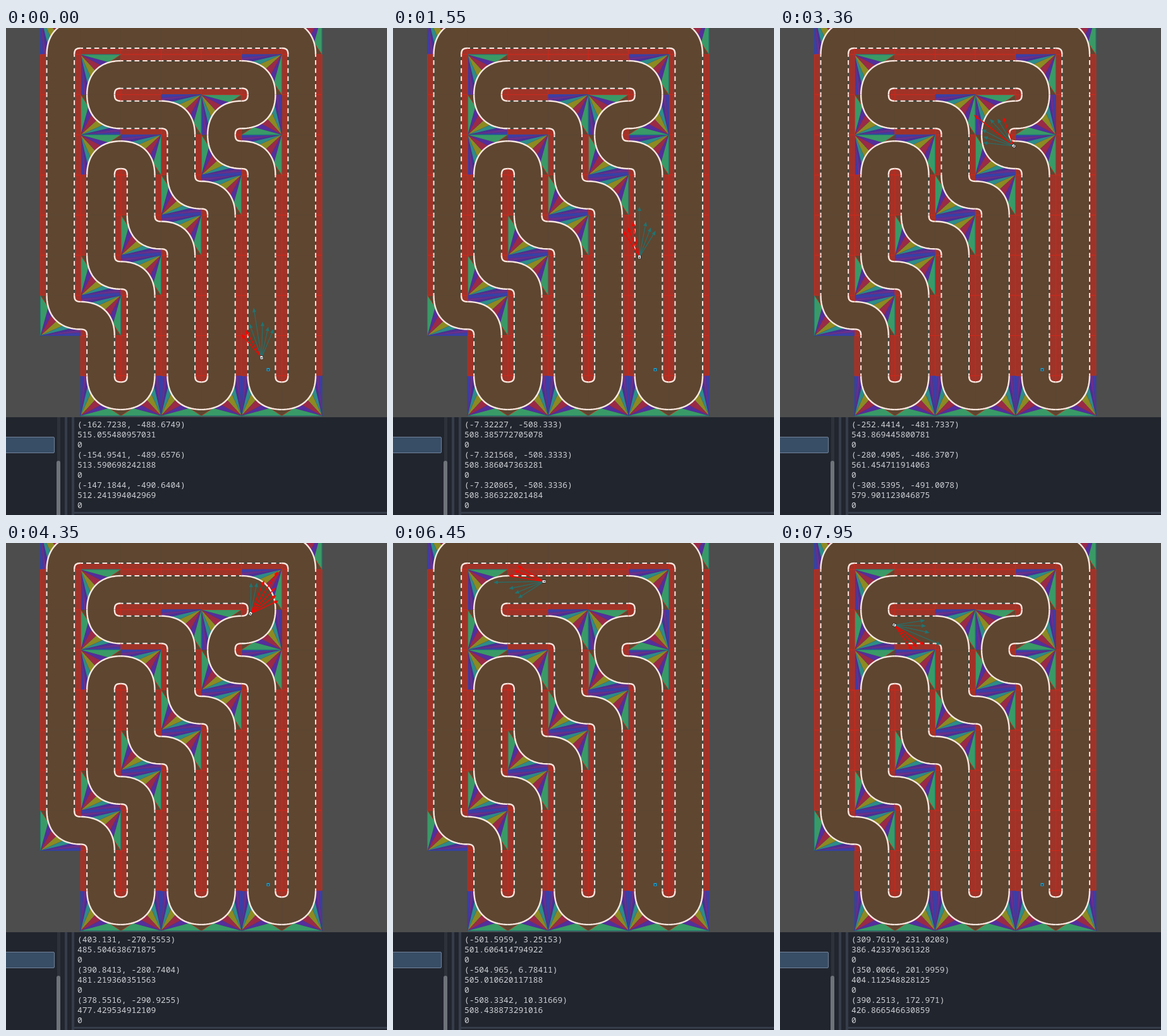
These frames come from a looping animation (603x772 px, 8 s). An HTML page with a canvas:

```html
<!DOCTYPE html>
<html lang="en">
<head>
<meta charset="utf-8">
<title>Track driving</title>
<style>
  html, body { margin: 0; width: 100%; height: 100%; overflow: hidden; background: #4d4d4d; }
  #stage { position: relative; width: 603px; height: 772px; overflow: hidden; }
  canvas { position: absolute; left: 0; top: 0; }
  #dock { position: absolute; left: 0; top: 617px; width: 603px; height: 155px; background: #21252e; overflow: hidden; }
  #dock i { position: absolute; background: #363d4a; }
  #dock .item { left: -4px; top: 31px; width: 79px; height: 24px; background: #384d66; border: 1px solid #71839a; border-radius: 2px; }
  #dock .rail { left: 81px; top: 0; width: 5px; height: 155px; background: #2d323b; }
  #dock .grip { left: 80px; top: 69px; width: 6px; height: 90px; background: #6e7379; border-radius: 3px; }
  #dock .split { top: 0; width: 4px; height: 155px; }
  #dock .base { left: 108px; top: 150px; width: 495px; height: 3px; }
  #log { position: absolute; left: 113px; top: 3px; margin: 0; color: #cfd1d5; white-space: pre;
         font: 12.95px/16px "Noto Sans Mono", "DejaVu Sans Mono", monospace; }
</style>
</head>
<body>
<div id="stage">
  <canvas id="view" width="603" height="617"></canvas>
  <div id="dock">
    <i class="item"></i><i class="rail"></i><i class="grip"></i>
    <i class="split" style="left:93px"></i><i class="split" style="left:104px"></i>
    <i class="base"></i>
    <pre id="log"></pre>
  </div>
</div>
<script>
const LOOP = 8000, STEP = 50;
const TILE = 63.65, HALF = TILE / 2, WALL = 10, LEFT = 54.5, TOP = 42;
const DIRS = { R: [1, 0], D: [0, 1], L: [-1, 0], U: [0, -1] };
const ROUTE = 'R6 D9 L1 U6 L1 U1 R1 U1 L4 D1 R2 D2 R1 D5 L1 U4 L1 U2 L1 D3 R1 D3 L1 U2 L1 U7';
const FAN = ['#3f3da6', '#6a2f8c', '#4a2f9c', '#2d8c88', '#8c8a22', '#9a2a46', '#552e9c', '#399a67'];
const ROAD = '#5e4631', BRICK = '#a03328', RED = '#d8281a', WHITE = '#fbe9e1';

// Follow the route and keep each tile's entry and exit direction.
const tiles = new Map();
{
  let col = 0, row = -1, enter = DIRS.U;
  for (const exit of ROUTE.split(' ').flatMap(s => Array(+s[1]).fill(DIRS[s[0]]))) {
    tiles.set(col + ',' + row, { col, row, enter, exit, turn: enter !== exit });
    col += exit[0];
    row += exit[1];
    enter = exit;
  }
}
const cornerSide = t => [t.exit[0] - t.enter[0], t.exit[1] - t.enter[1]];
const centre = t => [LEFT + t.col * TILE + HALF, TOP + t.row * TILE + HALF];

function innerCorner(t) {
  const [x, y] = centre(t), [sx, sy] = cornerSide(t);
  return [x + sx * HALF, y + sy * HALF];
}

function inWall(x, y) {
  const t = tiles.get(Math.floor((x - LEFT) / TILE) + ',' + Math.floor((y - TOP) / TILE));
  if (!t) return true;
  if (t.turn) {
    const [ix, iy] = innerCorner(t), d = Math.hypot(x - ix, y - iy);
    return d < WALL || d > TILE - WALL + .4;
  }
  const [cx, cy] = centre(t);
  return Math.abs(t.exit[0] ? y - cy : x - cx) > HALF - WALL - 1.5;
}

function trace(g, points) {
  g.beginPath();
  points.forEach(p => g.lineTo(...p));
}

function line(g, points, color, width) {
  trace(g, points);
  g.strokeStyle = color;
  g.lineWidth = width;
  g.stroke();
}

function fillShape(g, points, color) {
  trace(g, points);
  g.fillStyle = color;
  g.fill();
}

// Points of a quarter bend from (r, 0) to (0, r); k sets how square it is.
function bend(r, k, count, end = 1) {
  return Array.from({ length: count + 1 }, (_, i) => {
    const u = i / count * end, v = 1 - u;
    const mid = 3 * u * v;
    return [r * (v ** 3 + mid * (v + k * u)), r * (u ** 3 + mid * (u + k * v))];
  });
}

function drawStraight(g, t) {
  g.translate(...centre(t));
  if (t.exit[0]) g.rotate(Math.PI / 2);
  const edge = HALF - WALL, dash = 7.6;
  for (const side of [-1, 1]) {
    g.save();
    g.scale(side, 1);
    g.fillStyle = BRICK;
    g.fillRect(edge, -HALF, WALL, TILE);
    line(g, [[edge, -HALF], [HALF, -HALF], [HALF, HALF], [edge, HALF]], RED, .8);
    const border = [[edge, -HALF], [edge, HALF]];
    line(g, border, '#2c4a44', 1.6);
    g.setLineDash([dash, TILE / 5 - dash]);
    g.lineDashOffset = dash / 2;
    line(g, border, WHITE, 2);
    g.restore();
  }
}

function drawTurn(g, t) {
  const [sx, sy] = cornerSide(t), outer = TILE - WALL, tip = [TILE, TILE];
  const flat = sx * sy < 0 && t.row < 8;
  g.translate(...innerCorner(t));
  g.scale(-sx, -sy);
  if (flat) g.transform(0, 1, 1, 0, 0, 0);

  const rim = [[TILE, 0], [TILE - WALL / 2, 0], ...bend(outer, .62, FAN.length - 3, .8), [0, TILE]];
  FAN.forEach((color, i) => {
    fillShape(g, [tip, rim[i], rim[i + 1]], color);
    line(g, [tip, rim[i + 1]], 'rgba(40,50,140,.5)', .7);
  });
  line(g, rim.slice(-2), RED, .8);
  line(g, [[TILE, 0], tip], '#2b45a8', 1);
  line(g, [tip, [0, TILE]], '#1d8274', 1);

  const cap = bend(WALL, .75, 8);
  fillShape(g, [[0, 0], ...cap], BRICK);
  line(g, [[WALL, 0], [0, 0], [0, WALL]], RED, .8);
  line(g, cap, WHITE, 2.4);
  line(g, bend(outer, .62, 24), WHITE, 2.4);
}

function buildTrack() {
  const layer = document.createElement('canvas');
  layer.width = 603;
  layer.height = 617;
  const g = layer.getContext('2d');
  g.fillStyle = '#4d4d4d';
  g.fillRect(0, 0, 603, 617);
  g.fillStyle = ROAD;
  for (const t of tiles.values()) {
    const [x, y] = centre(t);
    g.fillRect(x - HALF - .2, y - HALF - .2, TILE + .4, TILE + .4);
  }
  for (const t of tiles.values()) {
    g.save();
    (t.turn ? drawTurn : drawStraight)(g, t);
    g.restore();
  }
  g.fillStyle = '#1f93bd';
  g.fillRect(412.5, 539, 5, 5);
  g.fillStyle = '#123c52';
  g.fillRect(414, 541, 2, 2);
  return layer;
}

// Key moments of the drive; heading is in degrees clockwise from up.
const DRIVE = [
  [0, 404.5, 522.5, -9, -147.1844, -490.6404],
  [900, 391, 430, 0, -7.33, -508.33],
  [1550, 390, 363, 0, -7.320865, -508.3336],
  [2500, 388.6, 265, 0, -7.32, -508.3336],
  [2800, 388.3, 236, 18, 0, -440],
  [3350, 370, 187, -52, -308.5395, -491.0078],
  [3800, 345, 146, 10, -20, -480],
  [4100, 365, 122, 75, 440, -240],
  [4350, 387, 112, 33, 378.5516, -290.9255],
  [4760, 407, 85, -15, -60, -430],
  [5150, 366, 70, -83, -420.736, -81.53039],
  [6450, 239, 61, -91, -508.3342, 10.31669],
  [7490, 149, 99, -185, 20, 440],
  [7950, 181, 130, -247, 390.2513, 172.971]
].map(([time, x, y, heading, vx, vy]) => ({ time, x, y, heading, vx, vy }));
const PIXELS_PER_UNIT = 0.2033;

const mix = (a, b, u) => a + (b - a) * u;

function drive(t) {
  const next = Math.min(Math.max(DRIVE.findIndex(k => k.time > t), 1) , DRIVE.length - 1);
  const i = t >= DRIVE.at(-1).time ? DRIVE.length - 1 : next;
  const a = DRIVE[i - 1], b = DRIVE[i];
  const u = Math.min((t - a.time) / (b.time - a.time), 1);
  const reach = (b.time - a.time) / 1000 * PIXELS_PER_UNIT;
  const curve = (p, v) => mix(a[p], b[p], u * u * (3 - 2 * u)) +
    reach * u * (1 - u) * ((1 - u) * a[v] - u * b[v]);
  const blend = p => mix(a[p], b[p], u);
  return { x: curve('x', 'vx'), y: curve('y', 'vy'), heading: blend('heading'), vx: blend('vx'), vy: blend('vy') };
}

// Feelers get shorter away from the heading.
const feelerLength = n => n ? 48 + 9 / n ** 2 : 80;

function drawFeeler(g, x, y, degrees, length) {
  const a = degrees * Math.PI / 180, dx = Math.sin(a), dy = -Math.cos(a);
  const at = (d, side) => [x + dx * d - dy * side, y + dy * d + dx * side];
  let hit = false;
  for (let d = 4; d <= length && !hit; d++) hit = inWall(...at(d, 0));
  const color = hit ? '#f80500' : '#207371';
  line(g, [[x, y], at(length - 3, 0)], color, hit ? 1.4 : 1.1);
  fillShape(g, [at(length, 0), at(length - 7, 3), at(length - 7, -3)], color);
}

function drawCar(g, { x, y, heading }) {
  for (let n = -3; n <= 3; n++) drawFeeler(g, x, y, heading + n * 10.6, feelerLength(n));
  g.save();
  g.translate(x, y);
  g.rotate(heading * Math.PI / 180);
  g.fillStyle = '#15171a';
  g.fillRect(-2.5, -3, 5, 6);
  g.fillStyle = '#f4f4f4';
  g.fillRect(-2, -2.5, 4, 5);
  g.fillStyle = '#222';
  g.fillRect(-.8, -.5, 1.6, 2);
  g.restore();
}

const digits = (n, count) => String(Number(n.toPrecision(count)));

function logEntry(t) {
  const { vx, vy } = drive(t);
  const speed = Math.fround(Math.hypot(vx, vy));
  return [`(${digits(vx, 7)}, ${digits(vy, 7)})`, digits(speed, 15), '0'];
}

function logText(t) {
  const rows = [3, 2, 1, 0].flatMap(back => logEntry(t - back * STEP));
  const lastRowPending = t >= 4700 && t < 5400;
  return (lastRowPending ? rows.slice(-10, -1) : rows.slice(-9)).join('\n');
}

const view = document.getElementById('view').getContext('2d');
const log = document.getElementById('log');
const track = buildTrack();
let shown = -1;

function frame() {
  const t = Math.floor(performance.now() % LOOP / STEP) * STEP;
  if (t !== shown) {
    shown = t;
    view.drawImage(track, 0, 0);
    drawCar(view, drive(t));
    log.textContent = logText(t);
  }
  requestAnimationFrame(frame);
}
frame();
</script>
</body>
</html>
```
